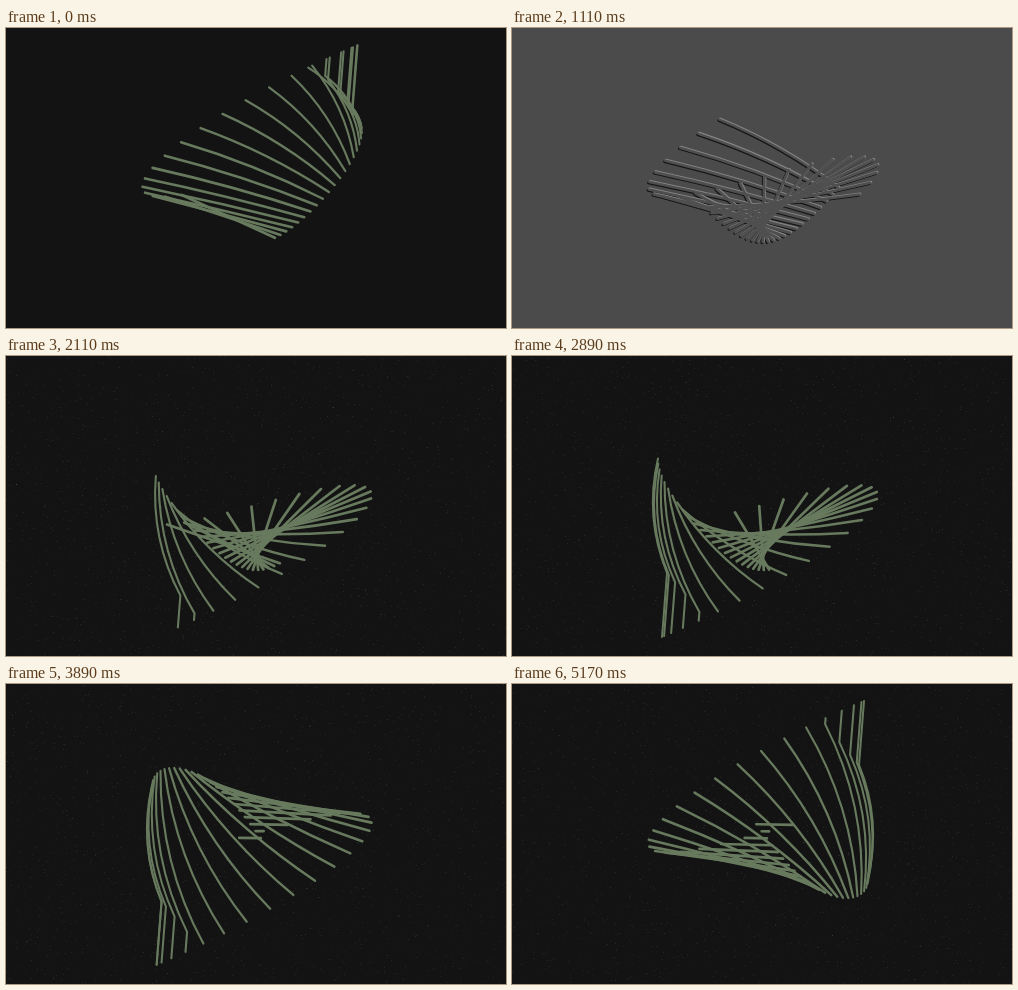
Write an HTML page with a canvas that moves like this. It is 500x300 px and loops after 5340 ms.

```html
<!DOCTYPE html>
<html lang="en">
<head>
<meta charset="utf-8">
<title>Ribbon of lines</title>
<style>
  html, body { margin: 0; width: 100%; height: 100%; overflow: hidden; background: #131313; }
  canvas { display: block; width: 100vw; height: 100vh; }
</style>
</head>
<body>
<canvas id="stage" width="500" height="300"></canvas>
<script>
const ctx = document.getElementById('stage').getContext('2d');
const { PI, cos } = Math;
const LOOP = 5340, STEP = 111.25, LINES = 24;
const HALF = 43.5; // lines in half a turn
const CENTER = { x: 251, y: 149 };

// [time in ms, position of the oldest visible line]
const pace = [[0, -4.6], [780, 3.9], [1560, 15.4], [2890, 20.5], [3440, 41.5], [4330, 44.4], [5117, 64]];

function tailAt(time) {
  const next = Math.max(1, pace.findIndex(([t]) => t >= time));
  if (time >= pace[pace.length - 1][0]) return pace[pace.length - 1][1];
  const [t0, u0] = pace[next - 1], [t1, u1] = pace[next];
  return u0 + (u1 - u0) * (time - t0) / (t1 - t0);
}

// Both ends of a line follow Lissajous curves.
const outerEnd = a => [
  CENTER.x - 9 * cos(a) + 110 * cos(3 * a),
  CENTER.y - 86 * cos(a) - 51 * cos(3 * a) + 5 * cos(5 * a)
];
const innerEnd = a => [
  CENTER.x + 97 * cos(a) + 8 * cos(3 * a),
  CENTER.y + 65 * cos(1.5 * (a - PI / 2))
];

function strand(u) {
  const angle = PI * u / HALF;
  const tip = outerEnd(angle), end = innerEnd(angle);

  // Lines are bent near the two turning points of the outer end.
  const fromTurn = Math.abs(u - HALF * Math.round(u / HALF));
  const fold = Math.sign(cos(angle)) * Math.max(0, 1 - (fromTurn / 4.2) ** 2);
  const kink = [tip[0] - 5 * fold, tip[1] + 64 * fold];

  const swell = cos(angle) ** 4;
  const dx = end[0] - kink[0], dy = end[1] - kink[1];
  const bulge = 0.16 * swell;
  const bend = [kink[0] + dx / 2 + dy * bulge, kink[1] + dy / 2 - dx * bulge];
  return { tip, kink, bend, end, width: 2.7 - 0.7 * swell };
}

function drawStrands(strands, color, shift = 0) {
  ctx.save();
  ctx.translate(shift, -shift);
  ctx.strokeStyle = color;
  ctx.lineCap = ctx.lineJoin = 'round';
  for (const { tip, kink, bend, end, width } of strands) {
    ctx.lineWidth = width;
    ctx.beginPath();
    ctx.moveTo(...tip);
    ctx.lineTo(...kink);
    ctx.quadraticCurveTo(...bend, ...end);
    ctx.stroke();
  }
  ctx.restore();
}

function drawGrain(seed) {
  const random = () => (seed = (seed * 16807) % 2147483647) / 2147483647;
  for (let i = 0; i < 2000; i++) {
    ctx.fillStyle = `rgba(190,205,185,${0.03 + random() * 0.1})`;
    ctx.fillRect(Math.floor(random() * 500), Math.floor(random() * 300), 1, 1);
  }
}

function render(now) {
  const time = Math.floor((now % LOOP + 5) / STEP) * STEP;
  const tail = tailAt(time);
  const strands = Array.from({ length: LINES }, (_, i) => strand(tail + i));
  const embossed = time > 990 && time < 1990;

  ctx.fillStyle = embossed ? '#4b4b4b' : '#131313';
  ctx.fillRect(0, 0, 500, 300);
  if (embossed) {
    drawStrands(strands, '#141414', -0.9);
    drawStrands(strands, '#868686', 0.8);
    drawStrands(strands, '#4f4f4f');
  } else {
    if (time > 1990) drawGrain(7919 * (1 + Math.floor(time / 550)));
    drawStrands(strands, '#687a5e');
  }
}

const start = performance.now();
function tick() {
  render(performance.now() - start);
  requestAnimationFrame(tick);
}
tick();
</script>
</body>
</html>
```
